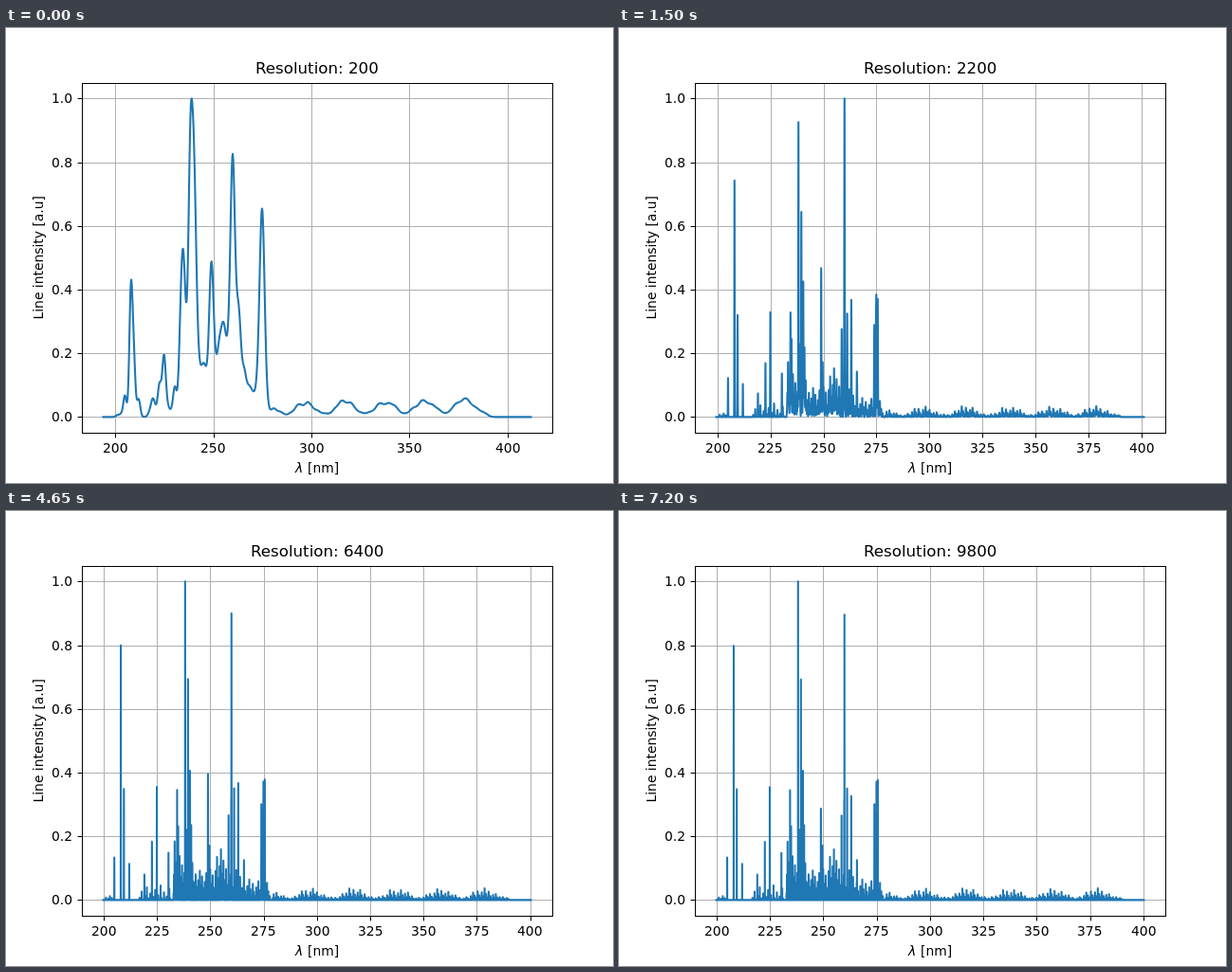
These frames come from a looping animation (640x480 px, 7350 ms). An HTML page with a canvas:

```html
<!DOCTYPE html>
<html>
<head>
<meta charset="utf-8">
<style>
  html, body { margin: 0; width: 100%; height: 100%; overflow: hidden; background: #fff; }
  canvas { display: block; }
</style>
</head>
<body>
<canvas id="plot" width="640" height="480"></canvas>
<script>
const ctx = document.getElementById('plot').getContext('2d');
const STEP_MS = 150, STEPS = 49;
const LEFT = 80, RIGHT = 576, TOP = 58, BOTTOM = 427;
const ZERO = 410.4, UNIT = 336;              // y of intensity 0, height of intensity 1
const DATA_X = LEFT + 496 / 22, DATA_W = 496 / 1.1;

// Main emission lines: [wavelength in nm, strength]
const lines = [
  [205, .133], [208.05, .8], [209.5, .348], [212, .113], [219.1, .08], [222.65, .182],
  [224.95, .355], [230.4, .148], [233.3, .183], [234.45, .345], [234.95, .23],
  [238.204, 1], [238.863, .22], [239.563, .69], [240.488, .405], [241.05, .235],
  [248.9, .26], [248.945, .26], [249.6, .17], [258.588, .265], [259.837, .315],
  [259.94, .893], [261.187, .35], [263.105, .2], [263.132, .2], [265.8, .125],
  [273.955, .3], [274.73, .27], [274.932, .37], [275.574, .375]
];
const main = [...lines];

let seed = 7;
const random = () => (seed = seed * 16807 % 2147483647) / 2147483647;

// Faint lines at jittered places, evenly mixed strengths, kept clear of the main lines
function addFaint(from, to, perNm, max, shape = () => 1) {
  for (let i = 0; i < (to - from) * perNm; i++) {
    const wave = from + (i + random()) / perNm;
    const strength = max * (i * .618034 % 1) ** 4 * shape(wave);
    if (main.every(([m]) => Math.abs(m - wave) > .08)) lines.push([wave, strength]);
  }
}
addFaint(200, 205, 3, .015);
addFaint(216, 232, 2, .05);
addFaint(232.5, 242, 7, .15);
addFaint(242, 252, 7, .1);
addFaint(252, 258, 7, .17);
addFaint(258, 264, 5, .1);
addFaint(264, 278, 5, .07);
addFaint(279, 390, 4, .04, wave => .6 + .4 * Math.cos(2 * Math.PI * (wave - 317.5) / 20.3));

// Every line becomes a Gaussian whose width is proportional to wavelength / resolution
function spectrum(res, lo, hi) {
  const dx = 44 / res;
  const n = Math.ceil((hi - lo) / dx) + 1;
  const values = new Float64Array(n);
  for (const [wave, strength] of lines) {
    const w = 1.1 * wave / res;
    const end = Math.min(n - 1, (wave + 4 * w - lo) / dx);
    for (let i = Math.max(0, Math.ceil((wave - 4 * w - lo) / dx)); i <= end; i++)
      values[i] += strength * Math.exp(-(((lo + i * dx - wave) / w) ** 2));
  }
  const peak = values.reduce((a, b) => Math.max(a, b));
  return values.map(v => v / peak);
}

const snap = v => Math.floor(v + .5);

function rect(color, x, y, w, h) {
  ctx.fillStyle = color;
  ctx.fillRect(x, y, w, h);
}

// align: 0 = left, .5 = centre, 1 = right; text starts on a whole pixel
function text(str, x, y, align = .5, size = 13.89, style = '') {
  ctx.fillStyle = '#000';
  ctx.font = `${style} ${size}px "DejaVu Sans", sans-serif`;
  ctx.fillText(str, snap(x - align * ctx.measureText(str).width), y);
}

function drawCurve(values) {
  const n = values.length;
  const flat = i => values[i] < 1e-4;
  ctx.beginPath();
  for (let i = 0; i < n; i++) {
    if (i && i < n - 1 && flat(i - 1) && flat(i) && flat(i + 1)) continue;
    ctx.lineTo(DATA_X + DATA_W * i / (n - 1), ZERO - UNIT * values[i]);
  }
  ctx.strokeStyle = '#1f77b4';
  ctx.lineWidth = 2.083;
  ctx.lineJoin = 'round';
  ctx.lineCap = 'square';
  ctx.stroke();
}

function draw(res) {
  const lo = 200 - 1210 / res, hi = 400 + 2376 / res;
  const gap = (hi - lo) * 1.1 / 9 > 25 ? 50 : 25;
  rect('#fff', 0, 0, 640, 480);

  for (let v = 200; v <= 400; v += gap) {
    const x = DATA_X + DATA_W * (v - lo) / (hi - lo);
    rect('#b0b0b0', snap(x), TOP, 1, BOTTOM - TOP);
    rect('#000', snap(x), BOTTOM + 1, 1, 4.4);
    text(v, x, 448);
  }
  for (let i = 0; i <= 5; i++) {
    const y = snap(ZERO - UNIT * i / 5);
    rect('#b0b0b0', LEFT, y, RIGHT - LEFT, 1);
    rect('#000', LEFT - 4.4, y, 4.4, 1);
    text((i / 5).toFixed(1), 70.3, y + 5, 1);
  }

  drawCurve(spectrum(res, lo, hi));

  ctx.strokeStyle = '#000';
  ctx.lineWidth = 1;
  ctx.lineJoin = 'miter';
  ctx.strokeRect(LEFT + .5, TOP + .5, RIGHT - LEFT, BOTTOM - TOP);

  text('Resolution: ' + res, 328, 48, .5, 16.67);
  text('λ', 304.5, 469, 0, 13.89, 'italic');
  text('[nm]', 351, 469, 1);
  ctx.save();
  ctx.translate(39, 242.5);
  ctx.rotate(-Math.PI / 2);
  text('Line intensity [a.u]', 0, 0);
  ctx.restore();
}

let shown = -1;
const start = performance.now();
function tick() {
  const step = Math.floor((performance.now() - start) / STEP_MS) % STEPS;
  if (step !== shown) {
    shown = step;
    draw(200 * (step + 1));
  }
  requestAnimationFrame(tick);
}
tick();
</script>
</body>
</html>
```
